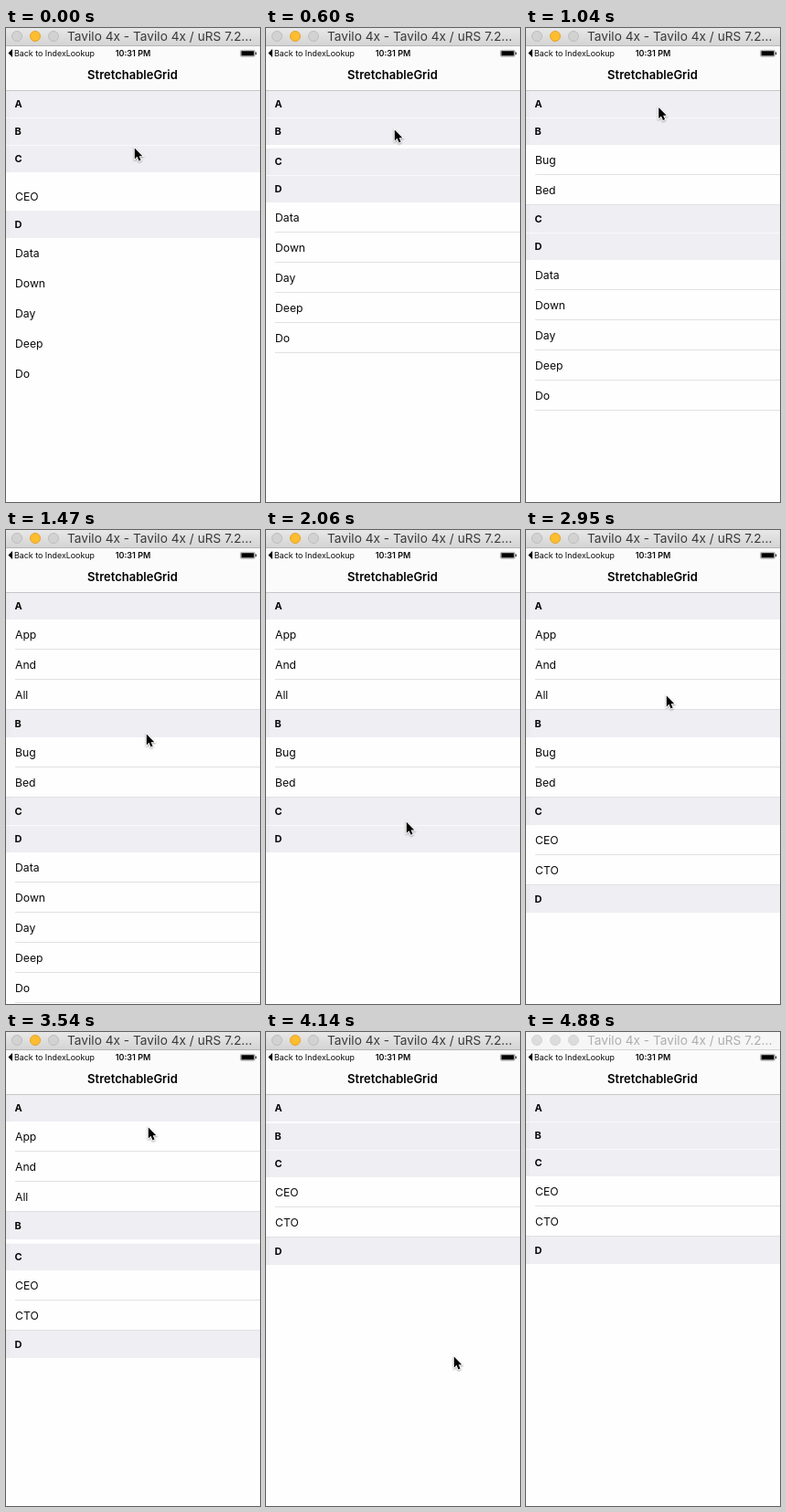
An HTML page with a canvas that plays this animation: 278x519 px, repeating every 4980 ms.

```html
<!DOCTYPE html>
<html lang="en">
<head>
<meta charset="utf-8">
<title>Expandable sections</title>
<style>
html, body { margin: 0; width: 278px; height: 519px; overflow: hidden; background: #fefefe; }
canvas { display: block; }
</style>
</head>
<body>
<canvas id="stage" width="278" height="519"></canvas>
<script>
const ctx = document.getElementById('stage').getContext('2d');
const LOOP = 4980, STEP = 148, TOP = 68, HEAD = 30, ROW = 33;
const SLIDE = 2; // steps a section takes to open or close

// Each tap, given as a step, toggles its section.
const sections = [
  { name: 'A', rows: ['App', 'And', 'All'], open: false, taps: [7.5, 26.13] },
  { name: 'B', rows: ['Bug', 'Bed'], open: false, taps: [3.74, 22.3] },
  { name: 'C', rows: ['CEO', 'CTO'], open: true, taps: [-.81, 16.4] },
  { name: 'D', rows: ['Data', 'Down', 'Day', 'Deep', 'Do'], open: true, taps: [11.4] }
];

// Resting points of the pointer: step, x, y
const stops = [
  [0, 140, 130], [3, 140, 110], [5, 140, 110], [8, 146, 77], [10, 153, 222],
  [11, 153, 328], [16, 153, 313], [20, 153, 180], [23, 152, 205],
  [24, 155, 103], [26, 156, 92], [28, 205, 354], [32, 251, 610]
];

function ease(p) {
  p = Math.min(1, Math.max(0, p));
  return p * p * (3 - 2 * p);
}

function openShare({ open, taps }, step) {
  return taps.reduce((share, tap) => {
    const p = ease((step - tap) / SLIDE);
    return share + (1 - 2 * share) * p;
  }, open ? 1 : 0);
}

function pointerAt(step) {
  const i = Math.max(1, stops.findIndex(s => s[0] >= step));
  const [t0, x0, y0] = stops[i - 1], [t1, x1, y1] = stops[i];
  const p = ease((step - t0) / (t1 - t0));
  return [x0 + (x1 - x0) * p, y0 + (y1 - y0) * p];
}

function rect(x, y, w, h, color) {
  ctx.fillStyle = color;
  ctx.fillRect(x, y, w, h);
}

function text(str, x, y, size, weight = 400, color = '#0a0a0a', align = 'left') {
  ctx.font = `${weight} ${size}px Inter, Roboto, sans-serif`;
  ctx.fillStyle = color;
  ctx.textAlign = align;
  ctx.fillText(str, x, y);
}

function drawWindowBar(active) {
  const shade = ctx.createLinearGradient(0, 0, 0, 19);
  shade.addColorStop(0, active ? '#e8e8e8' : '#f6f6f6');
  shade.addColorStop(1, active ? '#d4d4d4' : '#f6f6f6');
  rect(0, 0, 278, 19, shade);
  rect(0, 19, 278, 1, active ? '#b6b6b6' : '#d6d6d6');
  for (let i = 0; i < 3; i++) {
    const lit = active && i === 1;
    ctx.beginPath();
    ctx.arc(12 + 20 * i, 9, 5.5, 0, Math.PI * 2);
    ctx.fillStyle = lit ? '#fdbd2f' : active ? '#d2d2d2' : '#dcdcdc';
    ctx.fill();
    ctx.strokeStyle = lit ? '#e5a32a' : active ? '#bdbdbd' : '#d4d4d4';
    ctx.lineWidth = 1;
    ctx.stroke();
  }
  text('Tavilo 4x - Tavilo 4x / uRS 7.2...', 67, 14, 13.7, 400, active ? '#3a3a3a' : '#aeaeae');
}

function drawNavBar() {
  rect(0, 20, 278, 48, '#fbfbfb');
  rect(0, 68, 278, 1, '#c6c6c8');
  ctx.fillStyle = '#000';
  ctx.fill(new Path2D('M2.5 27.5L7 23V32Z'));
  text('Back to IndexLookup', 9, 31, 8.9);
  text('10:31 PM', 139, 31, 9, 600, '#0a0a0a', 'center');
  ctx.strokeStyle = '#888';
  ctx.lineWidth = .6;
  ctx.beginPath();
  ctx.roundRect(256.5, 24.3, 16, 7, 1.5);
  ctx.stroke();
  rect(257.5, 25.2, 14, 5.2, '#000');
  rect(273, 26.5, 1.2, 2.6, '#333');
  text('StretchableGrid', 138.5, 56, 13, 600, '#000', 'center');
}

function drawTable(step) {
  const lined = step > 0;
  let y = TOP, afterRows = false;
  sections.forEach((section, n) => {
    const { name, rows } = section;
    const full = rows.length * ROW;
    const seen = Math.round(full * openShare(section, step));

    rect(0, y, 278, HEAD, '#eeeef3');
    rect(0, y, 4, HEAD, '#eaeaef');
    if (n && !afterRows) rect(0, y, 278, 1, '#f9f9fb');
    if (lined && afterRows) rect(0, y - 1, 278, 1, '#e0e0e4');
    text(name, 9.5, y + 19, 11, 700);
    y += HEAD;

    // Rows sink behind the next header while the section is partly open.
    ctx.save();
    ctx.beginPath();
    ctx.rect(0, y, 278, seen);
    ctx.clip();
    rows.forEach((label, i) => {
      const top = y + i * ROW + Math.floor((full - seen) * .42);
      text(label, 10, top + 21, 12.2);
      if (lined) rect(10, top + ROW - 1, 268, 1, '#e1e1e3');
    });
    ctx.restore();
    y += seen;
    afterRows = seen > ROW / 4;
  });
}

function drawPointer(step) {
  const [x, y] = pointerAt(step);
  const arrow = new Path2D('M0 0V14L3.2 11L5.6 16.4L8 15.3L5.7 10.2H10Z');
  ctx.save();
  ctx.translate(x + .8, y + 1.5);
  ctx.scale(.85, .85);
  ctx.shadowColor = 'rgba(0,0,0,.35)';
  ctx.shadowBlur = 2;
  ctx.shadowOffsetY = 1;
  ctx.strokeStyle = '#fff';
  ctx.lineWidth = 2.2;
  ctx.stroke(arrow);
  ctx.shadowColor = 'transparent';
  ctx.fillStyle = '#000';
  ctx.fill(arrow);
  ctx.restore();
}

function draw(now) {
  const step = Math.floor((now % LOOP + 12) / STEP);
  rect(0, 0, 278, 519, '#fefefe');
  drawTable(step);
  drawNavBar();
  drawWindowBar(step < 33);
  if (step < 32) drawPointer(step);
}

const start = performance.now();
function tick() {
  draw(performance.now() - start);
  requestAnimationFrame(tick);
}
tick();
</script>
</body>
</html>
```
